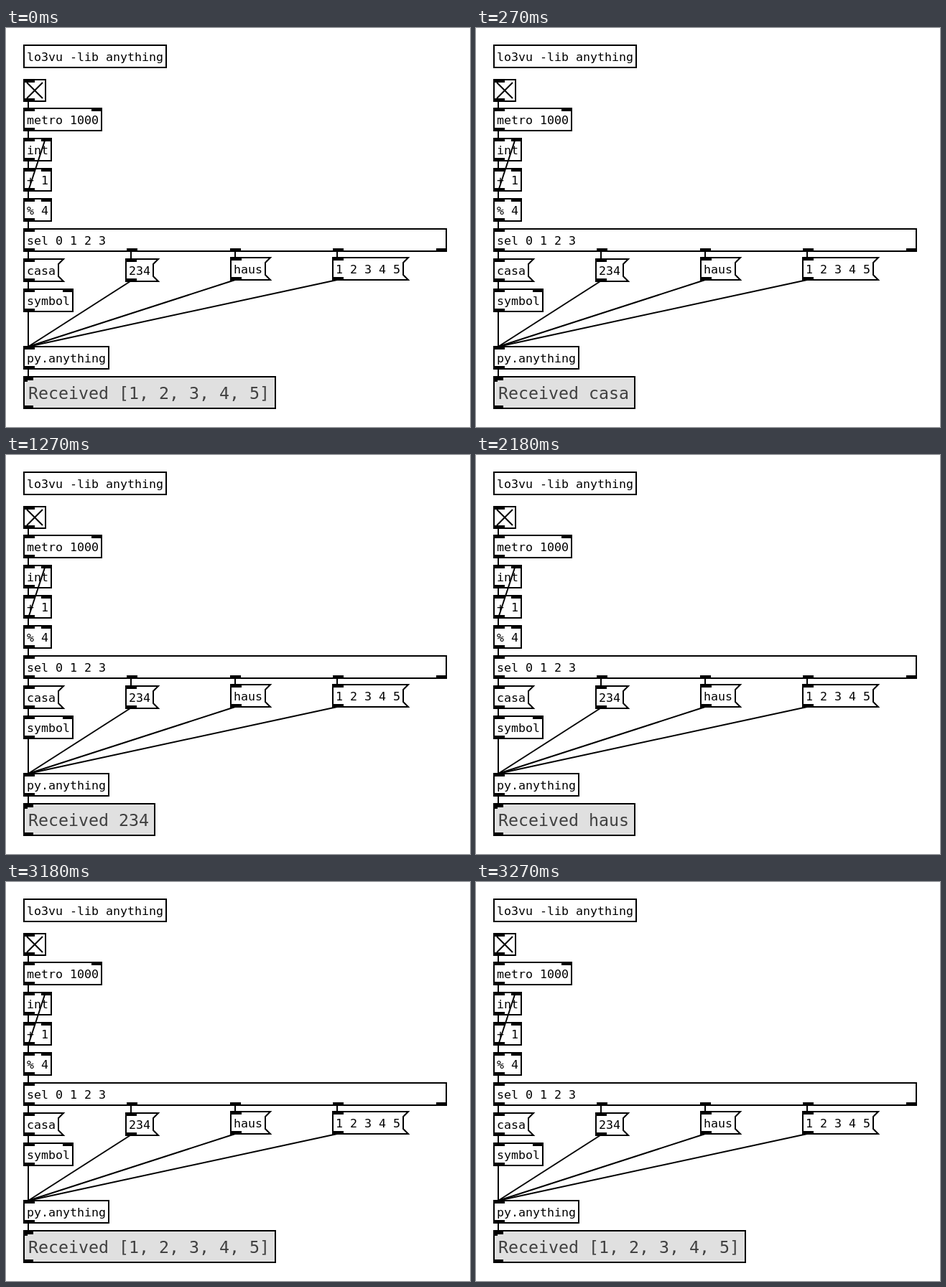
An HTML page that plays this animation: 646x556 px, repeating every 3.73 s.

```html
<!DOCTYPE html>
<html lang="en">
<head>
<meta charset="utf-8">
<title>Patch</title>
<style>
  html, body { margin: 0; width: 100%; height: 100%; overflow: hidden; background: #fff; }
  svg { display: block; }
  text { font: 16.61px "DejaVu Sans Mono", monospace; white-space: pre; }
  .frame { fill: none; stroke: #000; stroke-width: 2; }
  #display { fill: #e0e0e0; }
  #output { font-size: 23.25px; fill: #404040; }
</style>
</head>
<body>
<svg id="patch" width="646" height="556" viewBox="0 0 646 556"></svg>
<script>
const LOOP = 3730;
const STEPS = [
  [0, "[1, 2, 3, 4, 5]"],
  [140, "casa"],
  [1140, "234"],
  [2180, "haus"],
  [3180, "[1, 2, 3, 4, 5]"],
];
const BOX_HEIGHT = 31;
const patch = document.getElementById("patch");

function add(tag, attrs, content = "") {
  const node = document.createElementNS("http://www.w3.org/2000/svg", tag);
  for (const [key, value] of Object.entries(attrs)) node.setAttribute(key, value);
  node.textContent = content;
  patch.append(node);
  return node;
}

const path = d => add("path", { d, class: "frame" });
const block = (x, y, width = 15, height = 5) => add("rect", { x, y, width, height });
const inlet = (x, y) => block(x, y - 1);
const outlet = (x, bottom) => block(x, bottom - 4);
const label = (x, y, words) => add("text", { x: x + 4, y: y + 22 }, words);
const cord = (x1, y1, x2, y2) => path(`M${x1} ${y1}L${x2} ${y2}`);

function box(x, y, width, words) {
  add("rect", { x, y, width, height: BOX_HEIGHT, class: "frame" });
  label(x, y, words);
}

// Ports are horizontal offsets from the left edge of the box.
function object(y, width, words, inlets, outlets) {
  box(25, y, width, words);
  inlets.forEach(dx => inlet(25 + dx, y));
  outlets.forEach(dx => outlet(25 + dx, y + BOX_HEIGHT));
}

function message(x, y, words) {
  const right = x + words.length * 10 + 8;
  const bottom = y + BOX_HEIGHT;
  path(`M${x} ${y}H${right + 7}L${right} ${y + 7}V${bottom - 7}L${right + 7} ${bottom}H${x}Z`);
  label(x, y, words);
  inlet(x, y);
  outlet(x, bottom);
}

box(25, 24, 198, "lo3vu -lib anything");

add("rect", { x: 25, y: 72, width: 30, height: 30, class: "frame" });
path("M29 76L51 98M29 98L51 76");
inlet(25, 72);
outlet(25, 102);

object(112, 108, "metro 1000", [0, 94], [0]);
object(154, 38, "int", [0, 24], [0]);
object(196, 38, "+ 1", [0, 24], [0]);
object(238, 38, "% 4", [0, 24], [0]);
object(280, 588, "sel 0 1 2 3", [0], [0, 143, 287, 430, 574]);
object(364, 68, "symbol", [0, 54], [0]);
object(444, 118, "py.anything", [0], [0]);

message(25, 322, "casa");
message(167, 322, "234");
message(313, 320, "haus");
message(455, 320, "1 2 3 4 5");

const display = add("rect", { id: "display", class: "frame", x: 25, y: 486, height: 44 });
const output = add("text", { id: "output", x: 31, y: 517 });
block(24, 485, 14, 6);
block(24, 485, 6, 8);
block(24, 526, 14, 5);

for (const y of [102, 143, 185, 227, 269, 311, 353, 475]) cord(31, y, 31, y + 11);
cord(31, 395, 31, 444);
cord(31, 227, 55, 154);
cord(174, 311, 174, 322);
cord(319, 311, 319, 320);
cord(461, 311, 461, 320);
cord(173, 353, 31, 444);
cord(319, 351, 31, 444);
cord(461, 351, 31, 444);

function render() {
  const time = performance.now() % LOOP;
  const [, value] = STEPS.findLast(([start]) => start <= time);
  const words = "Received " + value;
  if (output.textContent !== words) {
    output.textContent = words;
    display.setAttribute("width", words.length * 14 + 14);
  }
  requestAnimationFrame(render);
}
render();
</script>
</body>
</html>
```
